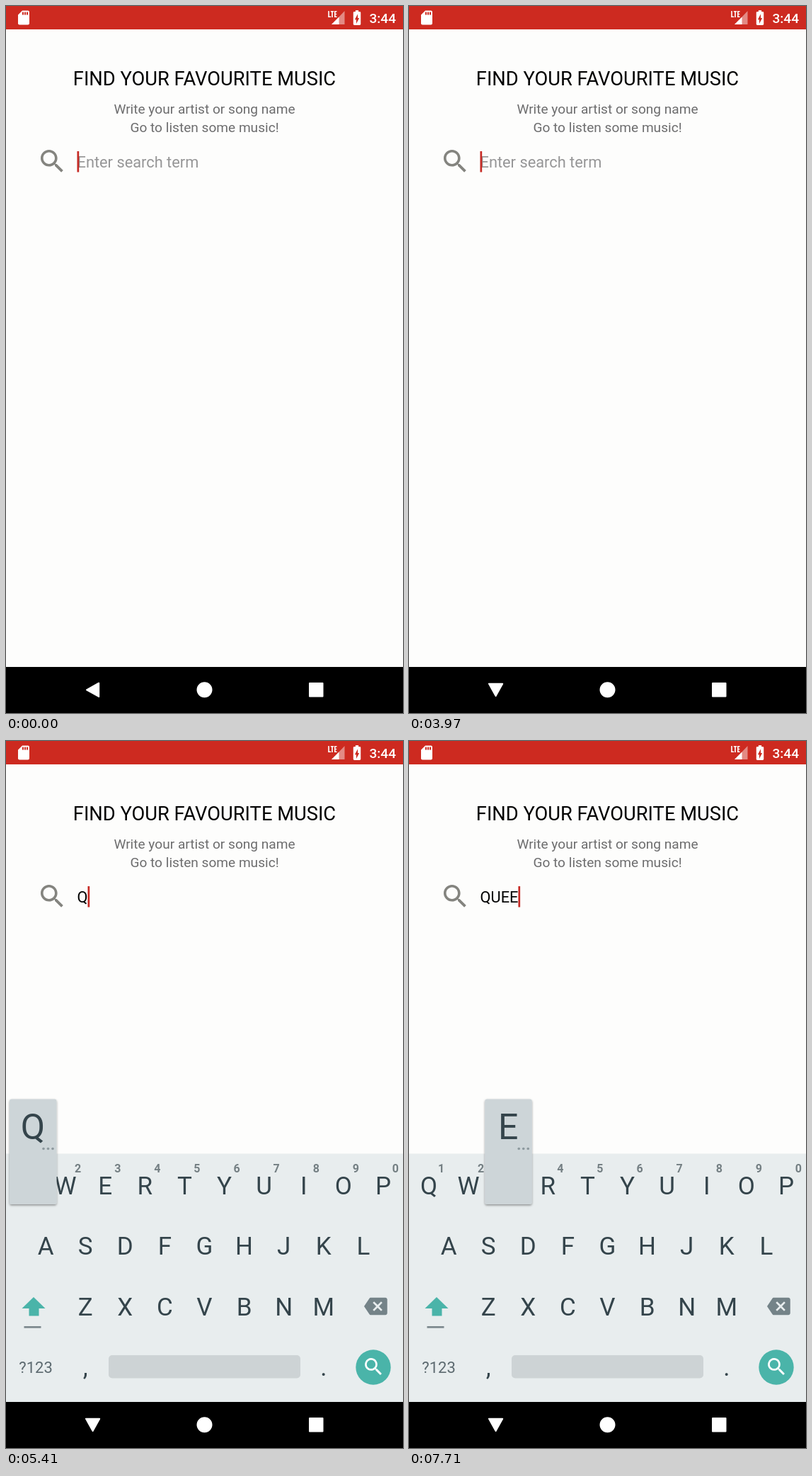
These frames come from a looping animation (561x998 px, 8 s). An HTML page:

```html
<!DOCTYPE html>
<html lang="en">
<head>
<meta charset="utf-8">
<title>Music search</title>
<style>
  html, body { margin: 0; width: 100%; height: 100%; overflow: hidden; background: #fdfdfc; }
  svg { display: block; width: 100%; height: 100%; font-family: Roboto, sans-serif; }
  .mid { text-anchor: middle; }
  .sub { font-size: 19.1px; fill: #6d6d6e; }
  .field { font-size: 21.8px; }
  .key { font-size: 35px; fill: #34444b; }
  .digit { font-size: 16px; font-weight: 700; fill: #747f83; }
</style>
</head>
<body>
<svg viewBox="0 0 561 998">
  <defs>
    <path id="lens" d="M15.5 14h-.79l-.28-.27C15.41 12.59 16 11.11 16 9.5 16 5.91 13.09 3 9.5 3S3 5.91 3 9.5 5.91 16 9.5 16c1.61 0 3.09-.59 4.23-1.57l.27.28v.79l5 4.99L20.49 19l-4.99-5zm-6 0C7.01 14 5 11.99 5 9.5S7.01 5 9.5 5 14 7.01 14 9.5 11.99 14 9.5 14z"/>
    <filter id="shadow" x="-20%" y="-10%" width="140%" height="120%">
      <feDropShadow dx="0" dy="1.5" stdDeviation="1.5" flood-opacity=".4"/>
    </filter>
  </defs>
  <rect width="561" height="998" fill="#fdfdfc"/>

  <!-- status bar -->
  <rect width="561" height="33" fill="#cd2a20"/>
  <g fill="#fff">
    <path transform="translate(13 4.5)" d="M18 2h-8L4.02 8 4 20c0 1.1.9 2 2 2h12c1.1 0 2-.9 2-2V4c0-1.1-.9-2-2-2zm-6 6h-2V4h2v4zm3 0h-2V4h2v4zm3 0h-2V4h2v4z"/>
    <path d="M456 7v8.2h3.2M458.8 7.8h4.4M461 7.8v8.2M467.5 7.8h-2.7v7.4h2.7M464.8 11.5h2.4" fill="none" stroke="#fff" stroke-width="1.6"/>
    <path d="M478.5 7v19H460l8.5-8.5z" opacity=".45"/>
    <path d="M460 26l10.5-10.5V26z"/>
    <path transform="translate(483.4 3.9) scale(1.05)" d="M15.67 4H14V2h-4v2H8.33C7.6 4 7 4.6 7 5.33v15.33C7 21.4 7.6 22 8.33 22h7.33c.74 0 1.34-.6 1.34-1.33V5.33C17 4.6 16.4 4 15.67 4zM11 20v-5.5H9L13 7v5.5h2L11 20z"/>
    <text x="551" y="24" font-size="19.1" font-weight="500" text-anchor="end">3:44</text>
  </g>

  <!-- search screen -->
  <text class="mid" x="280.5" y="112" font-size="27.3">FIND YOUR FAVOURITE MUSIC</text>
  <text class="mid sub" x="280.5" y="152">Write your artist or song name</text>
  <text class="mid sub" x="280.5" y="178">Go to listen some music!</text>
  <use href="#lens" transform="translate(43.5 197.5) scale(1.82)" fill="#84847f"/>
  <text class="field" id="hint" x="100.5" y="228" fill="#969697">Enter search term</text>
  <text class="field" id="typed" x="100.5" y="228"></text>
  <rect id="caret" y="205" width="2.7" height="29.5" fill="#c62a24"/>

  <rect y="933" width="561" height="65"/>

  <g id="keyboard">
    <rect y="582.5" width="561" height="351" fill="#e8edee"/>
    <rect y="933" width="561" height="65"/>
    <g id="keys"></g>
    <path d="M39 785l16.5 16H46.500v10.500h-14V801H22.500z" fill="#4ab4a9"/>
    <rect x="25.500" y="826" width="24" height="2.700" fill="#7d898e"/>
    <path transform="translate(506 781.6) scale(1.365)" fill="#748388" d="M22 3H7c-.69 0-1.23.35-1.59.88L0 12l5.41 8.11c.36.53.9.89 1.59.89h15c1.1 0 2-.9 2-2V5c0-1.1-.9-2-2-2zm-3 12.59L17.59 17 14 13.41 10.41 17 9 15.59 12.59 12 9 8.41 10.41 7 14 10.59 17.59 7 19 8.41 15.41 12 19 15.59z"/>
    <text class="mid" x="42" y="892" font-size="22" fill="#5d6a70">?123</text>
    <text class="key mid" x="112.2" y="896">,</text>
    <text class="key mid" x="448.8" y="896">.</text>
    <rect x="145" y="867" width="271" height="32.500" rx="5" fill="#cdd3d5"/>
    <circle cx="519" cy="884" r="24.700" fill="#4ab4a9"/>
    <use href="#lens" transform="translate(503 867) scale(1.365)" fill="#fff"/>
    <g id="popup">
      <rect x="-33" y="505.500" width="66.500" height="148.500" rx="3" fill="#cdd5d8" filter="url(#shadow)"/>
      <text class="mid" id="bigKey" y="562" font-size="50" fill="#34444b"></text>
      <g fill="#8d999e">
        <circle cx="15" cy="575.500" r="1.800"/><circle cx="21.500" cy="575.500" r="1.800"/><circle cx="28" cy="575.500" r="1.800"/>
      </g>
    </g>
  </g>

  <!-- navigation buttons -->
  <g fill="#fff" stroke="#fff" stroke-width="2" stroke-linejoin="round">
    <path id="back" d="M114 965.3l17.200-9.600v19.200z"/>
    <circle cx="280.500" cy="965.300" r="10"/>
    <rect x="429" y="956" width="18.500" height="18.500"/>
  </g>
</svg>
<script>
const LOOP = 8000, KEY_W = 56.1, FIELD_X = 100.5;
const $ = id => document.getElementById(id);
const show = (el, on) => el.setAttribute('visibility', on ? 'inherit' : 'hidden');

function addText(cls, x, y, s) {
  const el = document.createElementNS('http://www.w3.org/2000/svg', 'text');
  el.setAttribute('class', 'mid ' + cls);
  el.setAttribute('x', x);
  el.setAttribute('y', y);
  el.textContent = s;
  $('keys').append(el);
}

const rows = [['QWERTYUIOP', 0.5], ['ASDFGHJKL', 1], ['ZXCVBNM', 2]];
rows.forEach(([letters, start], r) => [...letters].forEach((c, i) => {
  const x = (start + i) * KEY_W;
  addText('key', x, 639.5 + r * 85.7, c);
  if (r === 0) addText('digit', x + 17.5, 609, (i + 1) % 10);
}));

// Each track lists [time, value]; a value holds until the next time.
const caretTrack = [[0, 1], [790, 0], [1310, 1], [1790, 0], [2270, 1], [2800, 0], [3270, 1],
  [3720, 0], [3970, 1], [4840, 0], [5330, 1], [6060, 0], [6230, 1]];
const textTrack = [[0, ''], [5330, 'Q'], [6230, 'QU'], [7270, 'QUE'], [7600, 'QUEE']];
const popupTrack = [[0, ''], [5190, 'Q'], [5890, ''], [6060, 'U'], [6760, ''], [7140, 'E']];
const at = (track, t) => track.findLast(([from]) => t >= from)[1];

function draw(t) {
  const text = at(textTrack, t), key = at(popupTrack, t);
  $('typed').textContent = text;
  show($('hint'), !text);
  show($('caret'), at(caretTrack, t));
  $('caret').setAttribute('x', FIELD_X + (text ? $('typed').getComputedTextLength() : 0));

  const p = Math.min(1, (1 + Math.floor((t - 4010) / 45)) / 5);
  show($('keyboard'), p > 0);
  $('keyboard').setAttribute('transform', `translate(0 ${35 * (1 - p) ** 2})`);
  $('keyboard').setAttribute('opacity', Math.max(0, Math.min(1, 2.1 * p)));

  show($('popup'), key);
  if (key) {
    const x = Math.max(38, (rows[0][0].indexOf(key) + 0.5) * KEY_W);
    $('popup').setAttribute('transform', `translate(${x} 0)`);
    $('bigKey').textContent = key;
  }
  $('back').setAttribute('transform', `rotate(${t < 3970 ? 0 : -90} 122.6 965.3)`);
}

const begin = performance.now();
function tick() {
  draw((performance.now() - begin) % LOOP);
  requestAnimationFrame(tick);
}
tick();
</script>
</body>
</html>
```
